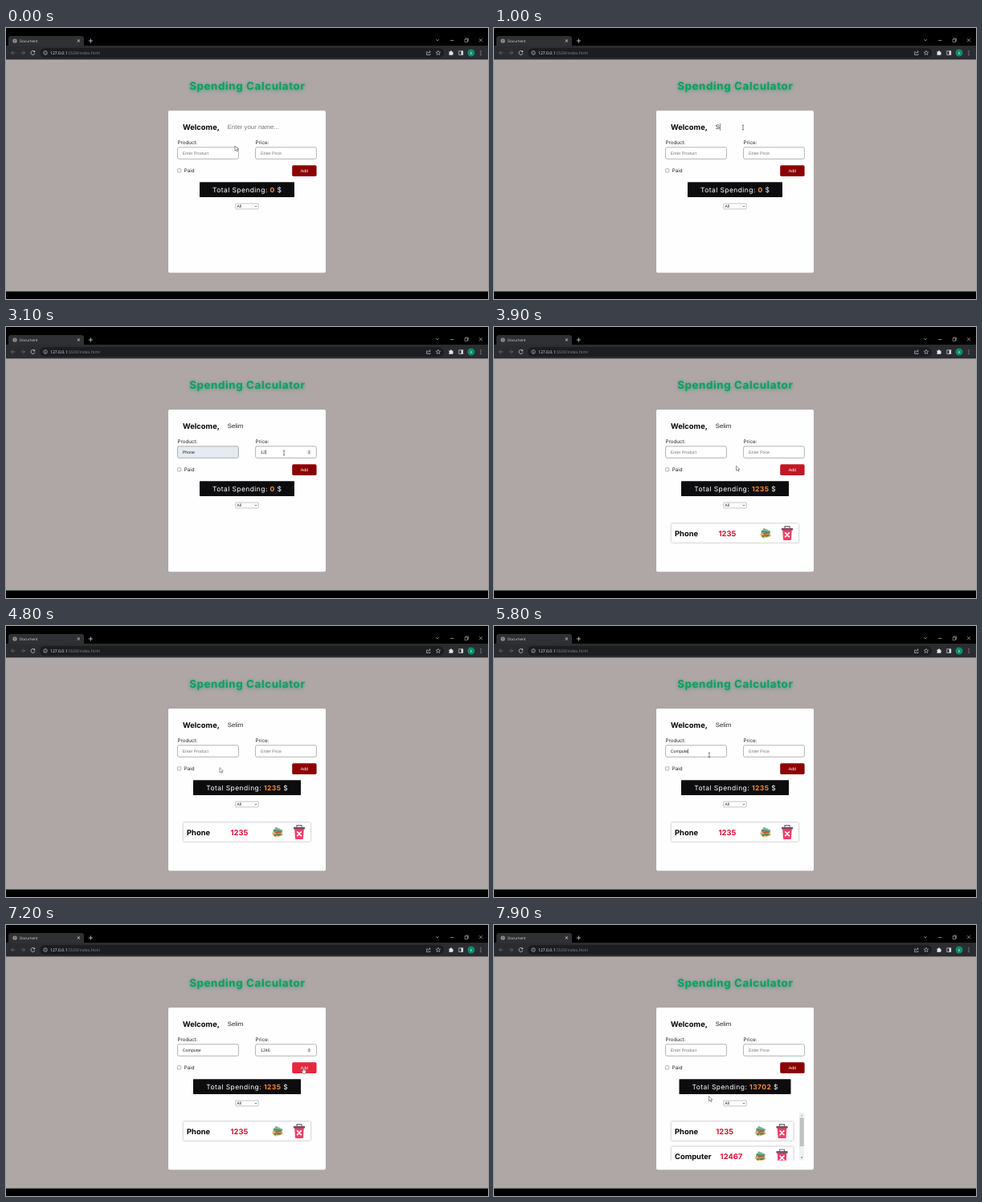
An HTML page for the animation above (8 s loop, 600 px wide and 338 px high).

```html
<!DOCTYPE html>
<html lang="en">
<head>
<meta charset="utf-8">
<title>Spending Calculator</title>
<style>
  html, body { margin: 0; width: 100%; height: 100%; overflow: hidden; background: #000; }
  svg { display: block; width: 100%; height: 100%; }
  text { text-rendering: geometricPrecision; white-space: pre; }
  .ui { font-family: "Open Sans", "Noto Sans", sans-serif; }
  .label { font: 400 6.25px Inter, sans-serif; fill: #222; }
  .bold { font: 700 9.375px Inter, sans-serif; fill: #050505; }
  .field { font: 5.25px "Liberation Sans", Arial, sans-serif; fill: #222; }
  .name { font-size: 7.8px; }
  .hint { fill: #757575; }
  .price { fill: #d3122f; }
  .title { font: 700 13.4px Inter, sans-serif; letter-spacing: .6px; fill: #0c9f60;
           filter: drop-shadow(.6px 1.2px 2px #0a9a5cb0); }
  .total { font: 400 8.5px Inter, sans-serif; letter-spacing: .42px; fill: #fff; }
  .total tspan { font-weight: 700; fill: #ff8a2b; }
  .box { fill: #fff; stroke: #808080; stroke-width: .6; }
  .card { fill: #fff; filter: drop-shadow(0 .6px 1.3px #0006); }
  .line { fill: none; stroke: #d5d6d8; stroke-width: .8; }
  .dim { stroke: #6c6e72; }
</style>
</head>
<body>
<svg viewBox="0 0 600 338">
  <defs>
    <clipPath id="listClip"><rect x="210" y="234" width="178" height="59.7"/></clipPath>
    <g id="money">
      <g stroke="#fff" stroke-width=".3">
        <rect x="-5" y="-5.5" width="10" height="5" rx=".6" fill="#6fa98c" transform="rotate(22)"/>
        <rect x="-5.5" y="-3.6" width="11" height="5" rx=".6" fill="#4f9473" transform="rotate(8)"/>
      </g>
      <path d="M-7 1Q-3 -2 1 -.5L6 1Q8 3 5 4L0 5.5Q-4 6.5-5 4Z" fill="#e8b05a"/>
      <path d="M-5 2.5L5 1.5L4 3.5L-3 4.6Z" fill="#3f7f62"/>
      <path d="M-3 -.6L4 -1.4L3.4 .6L-2.4 1.4Z" fill="#c9542f"/>
      <circle cx="-1" cy="4.4" r="1" fill="#f5d36b"/>
    </g>
    <g id="bin">
      <path d="M-3 -6V-8.2H3V-6" fill="none" stroke="#66727f" stroke-width="1.2"/>
      <path d="M-5.8 -4H5.8L5 8.2Q4.9 9 4 9H-4Q-4.9 9-5 8.2Z" fill="#ee3f67"/>
      <rect x="-7.2" y="-6.2" width="14.4" height="2.8" rx="1" fill="#7b4f62"/>
      <path d="M-2.4 -.1L2.4 4.7M2.4 -.1L-2.4 4.7" stroke="#fff" stroke-width="1.6" stroke-linecap="round"/>
    </g>
  </defs>

  <!-- Browser frame -->
  <rect width="600" height="338" fill="#000"/>
  <rect y="22" width="600" height="17.5" fill="#2b2c2f"/>
  <path d="M3 22.5V13Q3 10 6 10H94Q97 10 97 13V22.5Z" fill="#2f3033"/>
  <rect x="42" y="25" width="503" height="12" rx="6" fill="#1c1d20"/>
  <circle cx="11" cy="16" r="2.6" fill="#a9abad"/>
  <path d="M8.6 16H13.4M11 13.6Q9.3 16 11 18.4Q12.7 16 11 13.6" fill="none" stroke="#2f3033" stroke-width=".4"/>
  <g class="ui">
    <text x="17" y="17.7" font-size="4.6" fill="#d8d9db">Document</text>
    <text x="55" y="32.9" font-size="5.1" fill="#eee">127.0.0.1<tspan fill="#85888c">:5500/index.html</tspan></text>
  </g>
  <g class="line">
    <path d="M88.7 14.3L92 17.6M92 14.3L88.7 17.6M102.8 16H108M105.4 13.4V18.6"/>
    <path class="dim" d="M11.5 31H6.5M8.8 28.7L6.5 31L8.8 33.3M18.5 31H23.5M21.2 28.7L23.5 31L21.2 33.3"/>
    <path d="M35.4 29.3A2.5 2.5 0 1 0 35.9 31.7M35.7 28.2V30H33.9"/>
    <circle cx="49" cy="31" r="2.3" stroke-width=".6"/>
    <path d="M49 30.6V32.3M49 29.4V30" stroke-width=".6"/>
    <path d="M535.2 14.2L537 16L538.8 14.2M553 15.5H557.4M588.9 13.2L593 17.3M593 13.2L588.9 17.3" stroke-width=".6"/>
    <path d="M571 14H574.5V17.5H571ZM572 14V13H575.5V16.5H574.5" stroke-width=".5"/>
    <path d="M525 29.8H523.6V33.5H528V32M525 32Q525.3 29.8 528 29.7M526.8 28.3L528.3 29.7L526.8 31.1" stroke-width=".6"/>
    <path d="M538 28.2L538.8 30.1L540.8 30.2L539.3 31.5L539.8 33.5L538 32.4L536.2 33.5L536.7 31.5L535.2 30.2L537.2 30.1Z" stroke-width=".55"/>
    <rect x="563.8" y="28.8" width="5" height="4.6" stroke-width=".7"/>
  </g>
  <g fill="#e4e5e7">
    <path d="M551.4 29.5H553V29Q554 27.4 555 29V29.5H556.3V31Q558 31.6 556.3 32.5V33.8H551.4V32.4Q552.8 31.6 551.4 30.9Z"/>
    <rect x="566.6" y="28.8" width="2.2" height="4.6"/>
    <circle cx="591" cy="28.8" r=".55"/><circle cx="591" cy="31" r=".55"/><circle cx="591" cy="33.2" r=".55"/>
  </g>
  <circle cx="579" cy="31" r="4.5" fill="#0b8c6c"/>
  <text class="ui" x="579" y="32.6" font-size="4.4" text-anchor="middle" fill="#fff">K</text>

  <!-- Page -->
  <rect y="39.3" width="600" height="289" fill="#afa6a6"/>
  <rect y="328" width="600" height=".8" fill="#587a66"/>
  <text class="title" x="300.3" y="76.6" text-anchor="middle">Spending Calculator</text>
  <rect x="202" y="103" width="196" height="202.3" rx="1.8" fill="#fefefe"/>
  <text class="bold" x="220" y="126.6">Welcome,</text>
  <text class="field name" id="name" x="275.8" y="126"></text>
  <text class="label" x="213.4" y="145.2">Product:</text>
  <text class="label" x="310.6" y="145.2">Price:</text>
  <rect class="box" id="productBox" x="213.6" y="148.8" width="75.8" height="14.5" rx="1.8"/>
  <rect class="box" x="310.6" y="148.8" width="75.8" height="14.5" rx="1.8"/>
  <text class="field" id="product" x="219.8" y="157.9"></text>
  <text class="field" id="price" x="317" y="157.9"></text>
  <g id="spinner">
    <rect x="375.2" y="153.4" width="4.4" height="5.4" fill="#e6e6e6"/>
    <path d="M376.2 155.6L377.4 154.2L378.6 155.6ZM376.2 156.7L377.4 158.1L378.6 156.7Z" fill="#444"/>
  </g>
  <rect id="caret" width=".5" fill="#111"/>
  <rect class="box" x="213.6" y="175.7" width="4.2" height="4.2" rx=".7"/>
  <text class="label" x="221.8" y="180.2">Paid</text>
  <rect id="add" x="356.2" y="171.2" width="30.4" height="13.8" rx="1.8"/>
  <text class="field" x="371.3" y="180" text-anchor="middle" style="fill:#fff">Add</text>
  <rect id="bar" y="192.2" height="18.7" rx=".6" fill="#0c0c0e"/>
  <text class="total" x="300.2" y="204.8" text-anchor="middle">Total Spending: <tspan id="sum"></tspan> $</text>
  <rect class="box" x="285.8" y="219" width="28.4" height="6.8" rx=".6" style="stroke-width:.45"/>
  <text class="field" x="287.6" y="224.2" style="font-size:5px">All</text>
  <path d="M309.5 221.7L310.9 223.1L312.3 221.7" fill="none" stroke="#222" stroke-width=".6"/>

  <g clip-path="url(#listClip)">
    <g id="oneItem"></g>
    <g id="twoItems"></g>
  </g>

  <!-- Pointers -->
  <g id="arrow"><path d="M0 0V6.2L1.5 4.9L2.5 7L3.5 6.5L2.5 4.5H4.4Z" fill="#fff" stroke="#222" stroke-width=".45"/></g>
  <g id="beam"><path d="M-1.2 -2.8H1.2M0 -2.8V2.8M-1.2 2.8H1.2" stroke="#222" stroke-width=".55"/></g>
  <g id="hand"><path d="M-.6 .4Q0 -.5 .6 .4V2.6L3 3.2Q3.8 3.6 3.6 4.6L3 7.6H-.2L-2.2 4.6Q-1.8 3.6-.6 4.7Z" fill="#fff" stroke="#222" stroke-width=".4"/></g>
</svg>
<script>
const LOOP = 8000, STEP = 100;
const $ = id => document.getElementById(id);
const show = (id, on) => $(id).style.display = on ? '' : 'none';

const row = (y, right, name, price, priceX) => `
  <rect class="card" x="221" y="${y}" width="${right - 221}" height="23.5" rx="1"/>
  <text class="bold" x="225" y="${y + 15.7}">${name}</text>
  <text class="bold price" x="${priceX}" y="${y + 15.7}">${price}</text>
  <use href="#money" x="${right - 41}" y="${y + 12.3}"/>
  <use href="#bin" x="${right - 14}" y="${y + 11.6}"/>`;

$('oneItem').innerHTML = row(245.3, 379, 'Phone', 1235, 279.5);
$('twoItems').innerHTML = row(245.3, 372.5, 'Phone', 1235, 276.3)
  + row(276.6, 372.5, 'Computer', 12467, 281.6)
  + `<rect x="380" y="234" width="6.3" height="59.7" fill="#f1f1f1"/>
     <rect x="380.6" y="240.4" width="5.1" height="35.6" fill="#c1c1c1"/>
     <path d="M381.8 238.2L383.1 236.6L384.4 238.2Z" fill="#a3a3a3"/>
     <path d="M381.8 289.5L383.1 291.1L384.4 289.5Z" fill="#505050"/>`;

// Pointer path: time, x, y
const path = [
  [0, 285, 147], [300, 285, 147], [700, 310, 124], [1800, 310, 124],
  [2100, 253, 166], [2300, 246, 158], [2600, 246, 158], [2900, 346, 157],
  [3400, 346, 157], [3600, 370, 178], [3700, 370, 178], [3900, 301.5, 173],
  [4400, 264, 192], [4700, 264, 192], [4900, 268, 161], [6000, 268, 161],
  [6300, 340, 157], [6700, 340, 157], [6950, 370, 178], [7400, 370, 178],
  [7900, 267.5, 213.5]
];
const hover = [[3500, 0], [3700, 1], [3800, 1], [4050, 0], [6950, 0], [7150, 1], [7450, 1], [7700, 0]];

function at(keys, t) {
  const i = keys.findIndex(k => k[0] > t);
  if (i < 0) return keys[keys.length - 1].slice(1);
  if (!i) return keys[0].slice(1);
  const a = keys[i - 1], b = keys[i], p = (t - a[0]) / (b[0] - a[0]);
  return a.slice(1).map((v, n) => v + (b[n + 1] - v) * p);
}

// Each entry: field, text, focus time, one time per key press, blur time, clear time
const ADD1 = 3700, ADD2 = 7400;
const entries = [
  ['name', 'Selim', 700, [1000, 1150, 1300, 1450, 1600], 2300, LOOP],
  ['product', 'Phone', 2300, [2400, 2500, 2600, 2600, 2600], 2900, ADD1],
  ['price', '1235', 2900, [3000, 3100, 3200, 3300], ADD1, ADD1],
  ['product', 'Computer', 4900, [5200, 5300, 5400, 5500, 5600, 5700, 5800, 5900].map(t => t === 5200 ? t : t), 6300, ADD2],
  ['price', '12467', 6300, [6400, 6500, 6600, 6700, 7300], ADD2, ADD2]
];
const hints = { name: 'Enter your name...', product: 'Enter Product', price: 'Enter Price' };

function drawFields(t) {
  const typed = { name: '', product: '', price: '' };
  let focus = null, last = 0;
  for (const [field, text, start, keys, blur, clear] of entries) {
    if (t < start || t >= clear) continue;
    const n = keys.filter(k => k <= t).length;
    typed[field] = text.slice(0, n);
    if (t < blur) {
      focus = field;
      last = n ? keys[n - 1] : start;
    }
  }
  for (const field in typed) {
    $(field).textContent = typed[field] || hints[field];
    $(field).classList.toggle('hint', !typed[field]);
  }
  $('productBox').style.fill = typed.product === 'Phone' ? '#e4ecf2' : '';
  show('spinner', focus === 'price');
  const on = focus && (t - last) % 1000 < 500;
  show('caret', on);
  if (on) {
    const el = $(focus), size = focus === 'name' ? 7.8 : 5.25;
    const w = typed[focus] ? el.getComputedTextLength() : 0;
    $('caret').setAttribute('x', +el.getAttribute('x') + w + .2);
    $('caret').setAttribute('y', el.getAttribute('y') - size * .88);
    $('caret').setAttribute('height', size * 1.1);
  }
}

const inside = (x, y, l, t, r, b) => x >= l && x <= r && y >= t && y <= b;

function drawPointer(t) {
  const [x, y] = at(path, t);
  const kind = inside(x, y, 356, 171, 387, 185) ? 'hand'
    : inside(x, y, 213, 148, 290, 164) || inside(x, y, 310, 148, 387, 164)
      || inside(x, y, 272, 115, 386, 132) ? 'beam' : 'arrow';
  for (const id of ['arrow', 'beam', 'hand']) show(id, id === kind);
  $(kind).setAttribute('transform', `translate(${x} ${y})`);
}

function draw(t) {
  drawFields(t);
  const [sum, width] = t < ADD1 ? [0, 118] : t < ADD2 ? [1235, 134] : [13702, 139];
  $('sum').textContent = sum;
  $('bar').setAttribute('x', 300 - width / 2);
  $('bar').setAttribute('width', width);
  show('oneItem', sum === 1235);
  show('twoItems', sum === 13702);
  const [h] = at(hover, t);
  $('add').setAttribute('fill', `rgb(${139 + 90 * h},${40 * h},${62 * h})`);
  drawPointer(t);
}

function tick() {
  const t = performance.now() % LOOP;
  draw(Math.floor(t / STEP) * STEP);
  requestAnimationFrame(tick);
}
tick();
</script>
</body>
</html>
```
